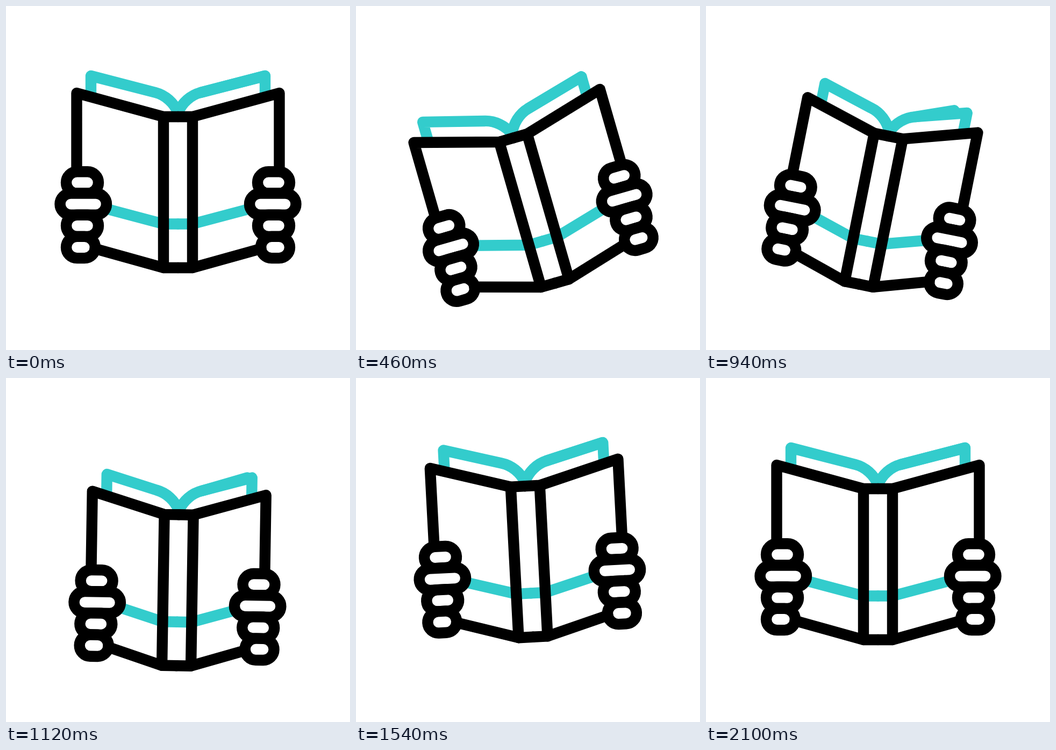
These frames come from a looping animation (640 by 640 pixels, 2.4 s). An HTML page with a canvas:

```html
<!DOCTYPE html>
<html lang="en">
<head>
<meta charset="utf-8">
<title>Reading a book</title>
<style>
html, body { margin: 0; width: 100%; height: 100%; overflow: hidden; background: #fff; }
canvas { display: block; width: 640px; height: 640px; }
</style>
</head>
<body>
<canvas id="stage" width="640" height="640"></canvas>
<script>
const ctx = document.getElementById('stage').getContext('2d');
const LOOP = 2400, MOVE = 2100, STEP = 20;
const TEAL = '#33cccc', BLACK = '#000';
const PIVOT_X = 320, PIVOT_Y = 305.5;
const FINGER = 40.2;
const spans = [[148, 208], [133, 219.5], [148, 208], [154, 208]];

function ease(t, from, to) {
  const u = Math.min(1, Math.max(0, (t - from) / (to - from)));
  return (1 - Math.cos(Math.PI * u)) / 2;
}

// Rocks from rest through evenly spaced peaks and back to rest.
function swing(t, first, step, peaks) {
  let value = 0, from = 0;
  [...peaks, 0].forEach((peak, i) => {
    const to = i < peaks.length ? first + step * i : MOVE;
    value += (peak - value) * ease(t, from, to);
    from = to;
  });
  return value;
}

const bob = t => swing(t, 350, 350, [57, -38, 55, -15.5, 15]);
const tilt = t => swing(t, 390, 470, [-17.7, 12.7, -7.5, 3.3]);
const squeeze = t => 27 * (ease(t, 180, 920) - ease(t, 1180, 1900));
const flap = t => 37 * ease(t, 480, 780) * (1 - 0.75 * ease(t, 780, 1120)) * (1 - ease(t, 1320, 1600));

function line(color, ...pts) {
  ctx.strokeStyle = color;
  ctx.beginPath();
  pts.forEach(([x, y]) => ctx.lineTo(x, y));
  ctx.stroke();
}

// Each half is drawn with x measured outwards from the spine.
function bothSides(draw) {
  for (const side of [-1, 1]) {
    ctx.save();
    ctx.scale(side, 1);
    draw(side);
    ctx.restore();
  }
}

function drawBook(t) {
  const inward = squeeze(t), fold = flap(t);
  const outer = (side, x, y) => [x - inward, y + inward * (side < 0 ? 0.11 : 0.19)];

  bothSides(side => {
    const corner = outer(side, 162, 130);
    ctx.strokeStyle = TEAL;
    ctx.beginPath();
    ctx.moveTo(0, 198);
    ctx.bezierCurveTo(8, 180, 23, 166, 42, 161);
    ctx.lineTo(...corner);
    ctx.lineTo(...outer(side, 162, 162));
    ctx.stroke();
    if (side > 0) line(TEAL, [42, 161], [corner[0] - fold, corner[1]]);
    line(TEAL, [0, 405.5], [27, 405.5], outer(side, 142, 375));
  });

  bothSides(side => {
    line(BLACK, outer(side, 188.5, 312), outer(side, 188.5, 162), [27, 206], [0, 206]);
    line(BLACK, [27, 206], [27, 487]);
  });

  bothSides(side => {
    ctx.strokeStyle = BLACK;
    ctx.fillStyle = '#fff';
    spans.forEach(([x0, x1], i) => {
      const [x, y] = outer(side, x0, 308.3 + FINGER * i);
      ctx.beginPath();
      ctx.roundRect(x, y, x1 - x0, FINGER, FINGER / 2);
      ctx.fill();
      ctx.stroke();
    });
    line(BLACK, [0, 487], [27, 487], outer(side, 154.5, 451.5));
  });
}

function render(t) {
  ctx.setTransform(1, 0, 0, 1, 0, 0);
  ctx.fillStyle = '#fff';
  ctx.fillRect(0, 0, 640, 640);
  ctx.lineWidth = 20.4;
  ctx.lineCap = ctx.lineJoin = 'round';
  ctx.translate(PIVOT_X, PIVOT_Y + bob(t));
  ctx.rotate(tilt(t) * Math.PI / 180);
  ctx.translate(0, -PIVOT_Y);
  drawBook(t);
}

const start = performance.now();
function tick(now) {
  const t = Math.max(0, now - start) % LOOP;
  render(Math.floor(t / STEP) * STEP);
  requestAnimationFrame(tick);
}
render(0);
requestAnimationFrame(tick);
</script>
</body>
</html>
```
